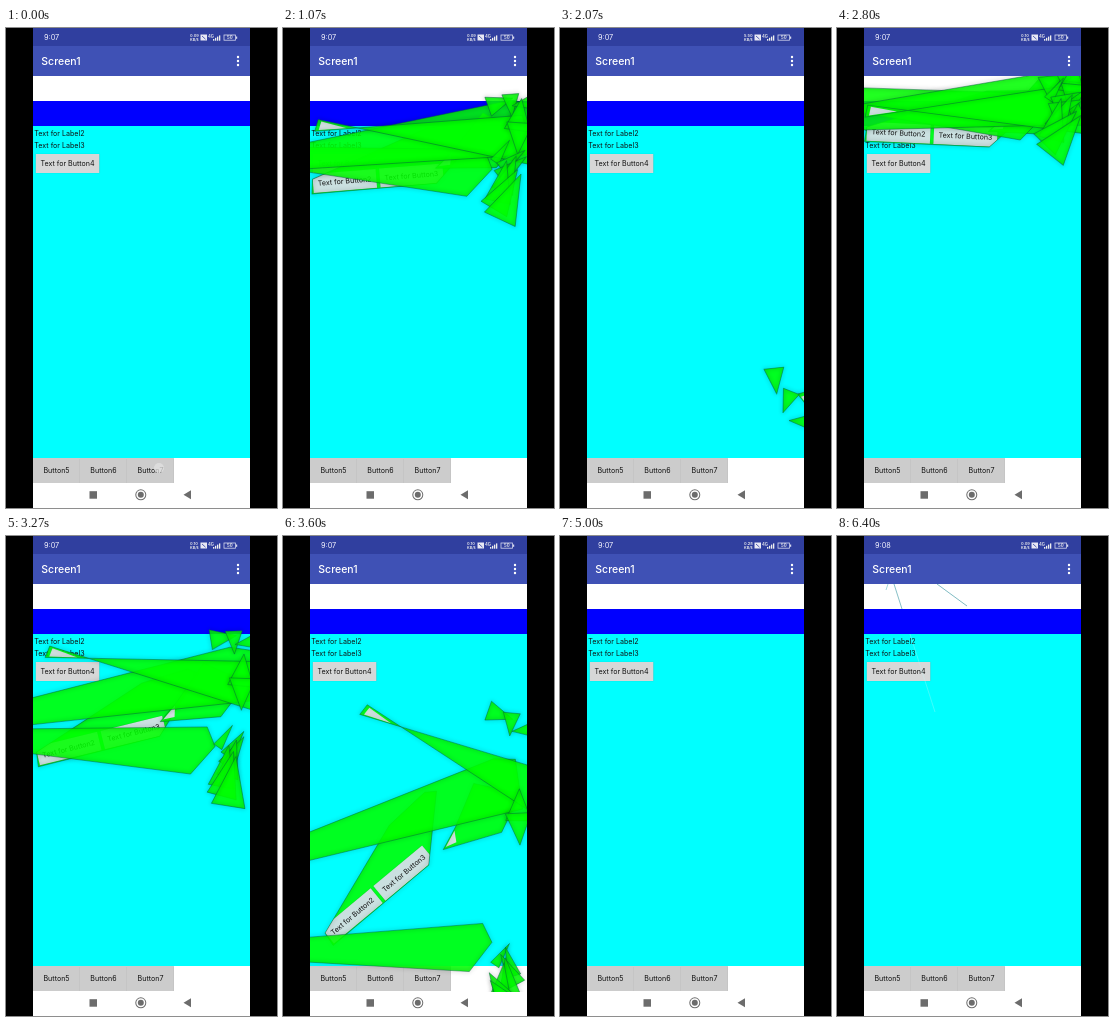
These frames come from a looping animation (271x480 px, 6470 ms). An HTML page with a canvas:

```html
<!DOCTYPE html>
<html lang="en">
<head>
<meta charset="utf-8">
<title>Shattering panel</title>
<style>
html, body { margin: 0; width: 100%; height: 100%; overflow: hidden; background: #000; }
canvas { display: block; width: 271px; height: 480px; }
</style>
</head>
<body>
<canvas></canvas>
<script>
const W = 271, H = 480, LOOP = 6470, STEP = LOOP / 97;
const LEFT = 27, RIGHT = 244, WIDTH = RIGHT - LEFT;
const RAD = Math.PI / 180;
const canvas = document.querySelector('canvas');
const ctx = canvas.getContext('2d');
const scale = window.devicePixelRatio || 1;
canvas.width = W * scale;
canvas.height = H * scale;

// Outlines are given at this moment of the fall (seconds squared).
const MID_FALL = 0.7225;

// Every shard drops by `fall` and turns by `spin` about `pivot`, both with time squared.
const largeShards = [
  { pts: [[150, 232], [162, 232], [148, 305], [46, 377], [39, 364], [112, 262]],
    pivot: [95, 330], fall: 314, spin: -53, buttons: true },
  { pts: [[159, 290], [172, 268], [192, 225], [238, 237], [218, 275]],
    pivot: [195, 258], fall: 245, spin: -24, pale: [174, 284] },
  { pts: [[5, 364], [200, 351], [209, 370], [186, 399], [5, 386]],
    pivot: [120, 375], fall: 412, spin: -8 },
  { pts: [[0, 281], [213, 202], [235, 203], [241, 253], [0, 305]],
    pivot: [113, 312], fall: 255, spin: -15 },
  { pts: [[75, 157], [68, 167], [270, 217], [270, 271]],
    pivot: [376, 332], fall: 295, spin: 32, pale: [106, 177] }
];

function seeded(seed) {
  return () => (seed = seed * 16807 % 2147483647) / 2147483647;
}

// A triangle around (x, y) whose apex points along `dir` degrees.
function wedge(x, y, length, width, dir, fall, spin) {
  const c = Math.cos(dir * RAD), s = Math.sin(dir * RAD);
  const at = (u, v) => [x + u * c - v * s, y + u * s + v * c];
  return {
    pts: [at(length * .6, 0), at(-length * .4, width / 2), at(-length * .4, -width / 2)],
    pivot: [x, y], fall, spin
  };
}

function makeDebris() {
  const random = seeded(41), list = [];
  for (let i = 0; i < 3; i++) {
    list.push(wedge(215 + 13 * i, 164 + 7 * i, 26 - 3 * i, 20 - 3 * i,
      14 + 80 * i, 155 + 12 * i, 58 / (1 + 3 * i)));
  }
  for (const side of [-1, 1]) {
    list.push(wedge(236, 256 + side * 9, 32, 26, side * 88, 275, -10));
  }
  for (let i = 0; i < 7; i++) {
    const spin = -130 * random();
    list.push(wedge(209 + 22 * random(), 380 + 8 * i, 26 + 4 * i, 10 + 4 * i,
      -85 + 30 * random() + spin * .395, 445, spin));
  }
  return list;
}

const shards = [...largeShards, ...makeDebris()];

function rect(x, y, w, h, fill) {
  ctx.fillStyle = fill;
  ctx.fillRect(x, y, w, h);
}

function label(text, x, y, size = 7.1, fill = '#111', align = 'left', weight = 400) {
  ctx.font = `${weight} ${size}px Inter, Roboto, sans-serif`;
  ctx.textAlign = align;
  ctx.textBaseline = 'alphabetic';
  ctx.fillStyle = fill;
  ctx.fillText(text, x, y);
}

function trace(pts) {
  ctx.beginPath();
  pts.forEach(([x, y]) => ctx.lineTo(x, y));
  ctx.closePath();
}

function disc(x, y, r, fill) {
  ctx.fillStyle = fill;
  ctx.beginPath();
  ctx.arc(x, y, r, 0, 7);
  ctx.fill();
}

function strokeLine(x1, y1, x2, y2, color, width) {
  ctx.strokeStyle = color;
  ctx.lineWidth = width;
  ctx.beginPath();
  ctx.moveTo(x1, y1);
  ctx.lineTo(x2, y2);
  ctx.stroke();
}

function button(x, y, text, fill = '#d6d7d7') {
  ctx.save();
  ctx.shadowColor = 'rgba(0,0,0,.3)';
  ctx.shadowBlur = scale;
  rect(x - 31.7, y - 9.5, 63.5, 19, fill);
  ctx.restore();
  label(text, x, y + 2.7, 7.1, '#111', 'center');
}

function drawStatus(t) {
  rect(LEFT, 0, WIDTH, 18, '#303f9f');
  label(t < 5500 ? '9:07' : '9:08', 38, 12.4, 7.3, '#f4f4ff');
  const rate = ['0.09', '5.50', '0.10', '0.28'][Math.floor(t / 1400) % 4];
  label(rate, 184, 9.2, 4, '#eee', 'left', 600);
  label('KB/s', 184, 12.8, 3.8, '#eee', 'left', 600);
  rect(194.5, 6.5, 6.5, 6, '#e8e8f4');
  strokeLine(196, 8, 199.5, 11.2, '#303f9f', .8);
  label('4G', 202, 9.8, 4.2, '#eee', 'left', 600);
  for (let i = 0; i < 4; i++) rect(207 + i * 2, 11 - i * 1.2, 1.3, 1.7 + i * 1.2, '#eee');
  ctx.strokeStyle = '#d5d8ee';
  ctx.strokeRect(218, 7, 11.5, 5.2);
  rect(230, 8.5, 1.2, 2.3, '#d5d8ee');
  label('50', 223.8, 11.4, 4.4, '#eee', 'center', 600);
}

function drawNav() {
  const gray = '#6c6c6c';
  rect(83.5, 463.2, 7.5, 7.5, gray);
  disc(134.8, 466.8, 5.5, gray);
  disc(134.8, 466.8, 4.5, '#fff');
  disc(134.8, 466.8, 3, gray);
  ctx.fillStyle = gray;
  trace([[177.5, 466.8], [185, 462.3], [185, 471.3]]);
  ctx.fill();
}

function drawScreen(t) {
  rect(0, 0, W, H, '#000');
  rect(LEFT, 0, WIDTH, H, '#fff');
  drawStatus(t);
  rect(LEFT, 18, WIDTH, 30, '#3f51b5');
  label('Screen1', 35.3, 37, 10.5, '#fff', 'left', 500);
  for (let i = -1; i < 2; i++) disc(232, 33 + 4 * i, 1.2, '#fff');
  rect(LEFT, 73, WIDTH, 25, '#00f');
  rect(LEFT, 98, WIDTH, 332, '#0ff');
  label('Text for Label2', 28.3, 107.5);
  label('Text for Label3', 28.3, 119.8);
  button(61.5, 135.5, 'Text for Button4');
  for (let i = 0; i < 3; i++) {
    const x = LEFT + 47 * i;
    rect(x, 430, 47, 25, '#ccc');
    rect(x + 46.4, 431, .6, 24, '#c0c0c0');
    label('Button' + (5 + i), x + 23.5, 445, 7.1, '#111', 'center');
  }
  drawNav();
}

function drawCard() {
  rect(LEFT, 48, WIDTH, 98, '#0f0');
  button(61.5, 100, 'Text for Button2');
  button(127, 100, 'Text for Button3');
}

function drawCracks(grow) {
  const crack = (x, y, dx, dy, color) =>
    strokeLine(x, y, x + dx * grow, y + dy * grow, color, .6);
  crack(57, 48, 8, 25, 'rgba(0,120,135,.8)');
  crack(51, 48, -2, 6, 'rgba(0,150,160,.6)');
  crack(100, 48, 30, 22, 'rgba(0,120,135,.85)');
  crack(73, 98, 25, 78, 'rgba(190,245,245,.55)');
}

// The uncovered corner between the first edge and an inner point.
function drawPaleCorner(corner) {
  const center = [0, 1].map(k => corner.reduce((sum, p) => sum + p[k] / 3, 0));
  trace(corner.map(p => p.map((v, k) => center[k] + (v - center[k]) * .72)));
  ctx.fillStyle = '#d0e0e0';
  ctx.fill();
}

function drawShardButtons([x, y]) {
  ctx.translate(x, y);
  ctx.rotate(-35 * RAD);
  for (const side of [-1, 1]) {
    button(33.5 * side, 0, 'Text for Button' + (side < 0 ? 2 : 3), '#cae0e0');
  }
}

function drawShard({ pts, pivot, fall, spin, pale, buttons }, q) {
  const [x, y] = pivot;
  ctx.save();
  ctx.translate(x, y + fall * q);
  ctx.rotate(spin * q * RAD);
  ctx.translate(-x, -y);

  ctx.save();
  trace(pts);
  ctx.fillStyle = 'rgba(0,255,0,.87)';
  ctx.fill();
  ctx.clip();
  if (pale) drawPaleCorner([pts[0], pts[1], pale]);
  if (buttons) drawShardButtons(pivot);
  ctx.restore();

  trace(pts);
  ctx.lineJoin = 'round';
  ctx.shadowColor = 'rgba(0,0,0,.8)';
  ctx.shadowBlur = 4 * scale;
  ctx.strokeStyle = 'rgba(0,95,60,.5)';
  ctx.lineWidth = .9;
  ctx.stroke();
  ctx.restore();
}

function drawFall(ms) {
  const q = (ms / 1000) ** 2 - MID_FALL;
  ctx.save();
  ctx.beginPath();
  ctx.rect(LEFT, 48, WIDTH, 408);
  ctx.clip();
  shards.forEach(shard => drawShard(shard, q));
  ctx.restore();
}

const within = (t, from, to) => t >= from && t < to;

function draw(t) {
  ctx.setTransform(scale, 0, 0, scale, 0, 0);
  drawScreen(t);
  if (t < 120) disc(153, 440, 5, `rgba(225,225,225,${t < 60 ? .75 : .3})`);
  if (within(t, 120, 680) || within(t, 2360, 2700) || within(t, 5060, 6330)) drawCard();
  if (within(t, 330, 680)) drawCracks((t - 330) / 350);
  if (t >= 5930) drawCracks(Math.min(1, (t - 5930) / 400));
  if (within(t, 680, 2330)) drawFall(t - 680);
  if (within(t, 2700, 4470)) drawFall(t - 2700);
}

const start = performance.now();
function tick() {
  const t = (performance.now() - start) % LOOP;
  draw(Math.floor((t + 5) / STEP) % 97 * STEP);
  requestAnimationFrame(tick);
}
tick();
</script>
</body>
</html>
```
